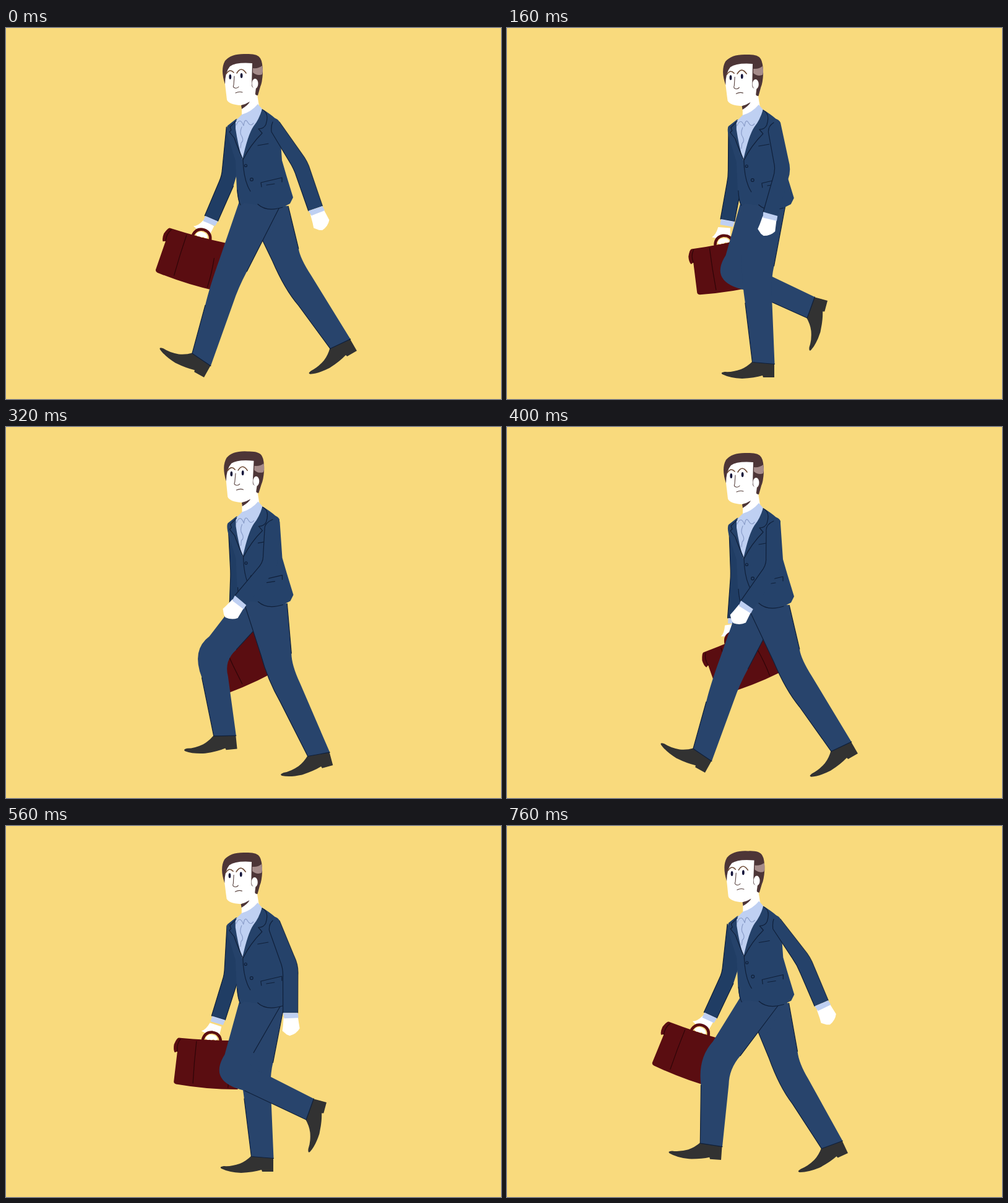
An HTML page for the animation above (0.8 s loop, 800 px wide and 600 px high).

```html
<!DOCTYPE html>
<html lang="en">
<head>
<meta charset="utf-8">
<title>Walking to work</title>
<style>
  html, body { margin: 0; width: 100%; height: 100%; overflow: hidden; background: #f9da7d; }
  svg { display: block; width: 100%; height: 100%; }
  .pants { fill: #28446c; }
  .jacket { fill: #25426a; }
  .sleeve { fill: #203d64; }
  .shirt { fill: #bfd0f2; }
  .skin { fill: #fff; }
  .hair { fill: #4d3537; }
  .shoe { fill: #323232; }
  .bag { fill: #5a0d11; }
  .ink, .fold, .brow, .line, .seam, .grip { fill: none; stroke-linecap: round; stroke-linejoin: round; }
  .ink { stroke: #10203a; stroke-width: 1.2; }
  .fold { stroke: #8a9dc9; stroke-width: 1.2; }
  .brow { stroke: #6e4a35; stroke-width: 1.6; }
  .line { stroke: #5a4440; stroke-width: 1.1; }
  .seam { stroke: #2e0508; stroke-width: 1.2; }
  .grip { stroke: #5a0d11; stroke-width: 4.5; }
</style>
</head>
<body>
<svg viewBox="0 0 800 600" xmlns="http://www.w3.org/2000/svg">
  <defs>
    <path id="shoe" class="shoe" d="M0 -23L-35 -26Q-44 -17 -54 -13Q-68 -8 -80 -9Q-88 -8 -84 -5Q-72 1 -52 2Q-32 1 -19 -3L-18 0L0 0Z"/>
  </defs>
  <rect width="800" height="600" fill="#f9da7d"/>

  <g id="bag">
    <path class="bag" d="M-53 2Q-56 2 -60 13Q-61 22 -58 26L-54 24L-57 73Q-57 76 -53 77Q0 83 47 80L43 1Q0 4 -53 2Z"/>
    <path class="seam" d="M-50 4Q-56 12 -54 24M-24 6Q-26 40 -26 74M29 30Q32 55 31 78"/>
  </g>
  <path id="farSleeve" class="sleeve"/>
  <path id="farEdge" class="ink"/>
  <g id="grip">
    <path class="skin" d="M-17 -11Q-10 -13 -4 -25L15 -20L12 -4L0 -9L-8 -7Z"/>
    <path class="grip" d="M-14 2Q-11 -10 1 -10Q13 -9 15 3"/>
    <path class="skin" d="M-10 0Q-6 -7 0 -6Q8 -6 10 1Q6 4 3 1Q0 4 -3 2Q-7 4 -10 0Z"/>
  </g>
  <path id="farCuff" class="shirt"/>

  <g id="farLeg"><use href="#shoe"/><path class="pants"/><path class="ink"/></g>
  <path id="hips" class="pants" d="M380 274L452 274L446 292L418 342L386 292Z"/>
  <g id="nearLeg"><use href="#shoe"/><path class="pants"/><path class="ink"/></g>

  <g id="torso">
    <path class="jacket" d="M372 147L358 158Q355 163 360 180L371 215L373 262Q375 280 379 287L385 283L407 286Q419 297 447 290L459 284L464 274L453 238L446 214L442 156Q440 147 414 131L384 150Z"/>
    <path class="skin" d="M381 128L404 96L409 126L381 152Z"/>
    <path class="shirt" d="M407 123L414 131Q409 148 400 159Q391 172 382 213Q375 190 371 163L371 150L381 140Q396 136 407 123Z"/>
    <path class="fold" d="M372 157Q378 143 384 158Q386 144 391 153Q395 160 400 154M381 160Q377 170 381 175Q385 182 380 186L379 194"/>
    <path class="ink" d="M414 132Q426 137 420 156Q417 163 408 163L414 170Q395 189 383 213Q373 190 369 178L361 168L364 165L362 160L372 150M383 213Q384 247 395 264M407 190L424 187M413 257L412 250L446 242L446 249M421 254L434 252M407 285Q421 298 447 290M374 262Q375 280 379 286"/>
    <circle class="ink" cx="387.5" cy="222.5" r="2"/>
    <circle class="ink" cx="397" cy="245" r="2.4"/>
  </g>

  <g id="head">
    <path class="skin" d="M357 55L353 82L357 116Q360 124 380 125Q395 121 404 107L407 54Z"/>
    <path class="hair" d="M380 125Q388 123 394 119Q392 124 381 131Z"/>
    <path class="hair" d="M354 91Q346 67 354 53Q364 41 388 42Q407 41 411 49Q415 55 415 73Q414 89 411 95L407 109Q402 109 403 105L404 97Q397 98 397 92L398 57Q372 55 362 62Q354 71 354 91Z"/>
    <path fill="#a58b8a" d="M399 65Q408 66 414 61Q416 69 414 75Q406 78 399 72Z"/>
    <ellipse class="skin" cx="402.5" cy="90" rx="5" ry="8"/>
    <ellipse fill="#14143a" cx="362.3" cy="79" rx="1.9" ry="4"/>
    <ellipse fill="#14143a" cx="380.6" cy="77" rx="1.9" ry="4"/>
    <path class="brow" d="M356 74Q362 65 368 72M373 73Q380 61 388 73"/>
    <path class="line" d="M369 78L368 92Q366 96 370 97Q374 98 376 95M371 105Q377 102 382 104"/>
  </g>

  <path id="nearSleeve" class="jacket"/>
  <path id="nearInk" class="ink"/>
  <path id="nearBack" class="ink"/>
  <g id="nearHand">
    <path class="skin" d="M-11 7L12 6L15 25Q10 34 -1 37L-6 35L-13 29L-12 21Z"/>
    <path class="shirt" d="M-12 0L12 0L13 8L-10 9Z"/>
  </g>
</svg>

<script>
const LOOP = 800, STEP = 40;
const $ = id => document.getElementById(id);

// time, heel x, heel y, toe drop in degrees, front knee x y, back knee x y
const stride = [
  [0, 320, 565, -29, 331, 415, 376, 420],
  [80, 395, 566, 0, 357, 408, 403, 397],
  [160, 432, 565, 0, 380, 404, 427, 409],
  [240, 471, 566, 0, 397, 405, 442, 402],
  [280, 503, 559, 5, 408, 396, 452, 386],
  [360, 551, 535, 25, 441, 421, 473, 387],
  [400, 567, 528, 30, 451, 422, 477, 377],
  [480, 550, 462, 84, 402, 422, 427, 385],
  [560, 518, 447, 75, 343, 408, 389, 386],
  [640, 447, 481, 49, 323, 368, 371, 371],
  [680, 404, 512, 17, 308, 364, 355, 374],
  [760, 346, 540, -4, 314, 379, 361, 393]
];
const bounce = [[0, 0], [80, 5], [160, 1], [240, -2], [280, -3], [360, -1.5]];

// smooth periodic curve through timed keys
function sample(keys, period, time) {
  const n = keys.length, t = ((time % period) + period) % period;
  const key = i => {
    const turn = Math.floor(i / n), k = keys[i - turn * n];
    return [k[0] + turn * period, ...k.slice(1)];
  };
  let i = n - 1;
  while (keys[i][0] > t) i--;
  const [a, b, c, d] = [i - 1, i, i + 1, i + 2].map(key);
  const span = c[0] - b[0], u = (t - b[0]) / span;
  return b.slice(1).map((v, j) => {
    const k = j + 1;
    const m0 = (c[k] - a[k]) / (c[0] - a[0]) * span;
    const m1 = (d[k] - b[k]) / (d[0] - b[0]) * span;
    const w = c[k] - v;
    return v + u * (m0 + u * (3 * w - 2 * m0 - m1 + u * (m0 + m1 - 2 * w)));
  });
}

const rad = deg => deg * Math.PI / 180;
const mix = (a, b, k) => [a[0] + (b[0] - a[0]) * k, a[1] + (b[1] - a[1]) * k];
const str = p => p[0].toFixed(2) + ' ' + p[1].toFixed(2);
const wave = (t, peak) => Math.cos(2 * Math.PI * (t - peak) / LOOP);

// a limb edge: straight, rounded joint, straight
function bend(a, joint, b, r, bulge = 1.3) {
  const p = mix(a, joint, 1 - r), q = mix(joint, b, r);
  const c = mix(mix(p, q, 0.5), joint, bulge);
  return `${str(a)}L${str(p)}Q${str(c)} ${str(q)}L${str(b)}`;
}

// point at a distance along a limb, and across it
function reach(p, deg, along, across = 0) {
  const s = Math.sin(rad(deg)), c = Math.cos(rad(deg));
  return [p[0] + s * along + c * across, p[1] + c * along - s * across];
}

function drawLeg(id, phase, lift, bob) {
  const [hx, hy, drop, fx, fy, bx, by] = sample(stride, LOOP, phase);
  const heel = [hx, hy - lift], front = [fx, fy - lift / 2], back = [bx, by - lift / 2];
  const c = Math.cos(rad(drop)), s = Math.sin(rad(drop));
  const onFoot = (x, y) => [heel[0] - x * c - y * s, heel[1] + x * s - y * c];
  const cuffF = onFoot(35.5, 24.5), cuffB = onFoot(-0.5, 21.5);
  const hipF = [380 + 0.05 * (fx - 380), 279 + bob];
  const hipB = [450 + 0.13 * (bx - 430), 288 + bob];
  const shin = bend(hipF, front, cuffF, 0.3, 1.65);
  const [shoe, pants, ink] = $(id).children;
  shoe.setAttribute('transform', `translate(${str(heel)}) rotate(${-drop})`);
  pants.setAttribute('d', `M${shin}L${bend(cuffB, back, hipB, 0.2)}Z`);
  const edge = fx > 385 ? shin : `${str(mix(front, cuffF, 0.3))}L${str(cuffF)}`;
  ink.setAttribute('d', `M${edge}L${str(cuffB)}M${str(mix(back, hipB, 0.2))}L${str(hipB)}`);
}

function drawFarArm(t, bob) {
  const s = wave(t, 722), tilt = -(13.5 + 11.5 * s);
  const top = [357.5 - 1.5 * s, 160 + bob], elbow = [355 - 8 * s, 239 + bob];
  const wrist = reach(elbow, tilt, 70), wristIn = reach(elbow, tilt, 70, 23);
  const inner = reach(elbow, tilt, 8, 24);
  const edge = bend(top, elbow, wrist, 0.15);
  $('farSleeve').setAttribute('d', `M${edge}L${str(wristIn)}L${str(inner)}L384 ${200 + bob}Z`);
  $('farEdge').setAttribute('d', `M${edge}L${str(wristIn)}L${str(inner)}`);
  const cuff = [reach(wrist, tilt, 0, 1), wristIn, reach(wristIn, tilt, 9, -1), reach(wrist, tilt, 9, 1)];
  $('farCuff').setAttribute('d', 'M' + cuff.map(str).join('L') + 'Z');
  const hand = [341 - 30 * s, 344.4 - 3.9 * s - 8.2 * s * s + bob];
  const place = `translate(${str(hand)}) rotate(${-3.7 + 23.5 * s})`;
  $('bag').setAttribute('transform', place);
  $('grip').setAttribute('transform', place);
}

function drawNearArm(t, bob) {
  const s = wave(t, 728), upper = 18.5 + 21.5 * s, fore = -8 + 32 * s;
  const elbow = reach([430, 160 + bob], upper, 72 + 6 * s);
  const wrist = reach(elbow, fore, 74);
  const mid = (upper + fore) / 2;
  const outer = bend([442, 152 + bob], reach(elbow, mid, 0, 12.5), reach(wrist, fore, 0, 12), 0.2);
  const inner = bend(reach(wrist, fore, 0, -12), reach(elbow, mid, 0, -12.5), [424 + 6 * s, 168 + bob], 0.2);
  $('nearSleeve').setAttribute('d', `M${outer}L${inner}Q424 ${154 + bob} 432 ${145 + bob}Q440 ${147 + bob} 442 ${152 + bob}Z`);
  $('nearInk').setAttribute('d', `M${inner}Q${423 + 6 * s} ${158 + bob} 431 ${152 + bob}`);
  $('nearBack').setAttribute('d', 'M' + outer);
  $('nearBack').setAttribute('opacity', s > 0 ? 0.8 : 0);
  $('nearHand').setAttribute('transform', `translate(${str(wrist)}) rotate(${-fore})`);
}

function draw(now) {
  const t = Math.floor(now / STEP) * STEP % LOOP;
  const bob = sample(bounce, LOOP / 2, t)[0];
  drawFarArm(t, bob);
  drawLeg('farLeg', t + LOOP / 2, 6, bob);
  drawLeg('nearLeg', t, 0, bob);
  drawNearArm(t, bob);
  $('hips').setAttribute('transform', `translate(0 ${bob})`);
  $('torso').setAttribute('transform', `translate(${-0.2 * bob} ${bob})`);
  $('head').setAttribute('transform', `translate(${-0.2 * bob} ${bob}) rotate(${-0.5 * bob} 395 150)`);
}

const begin = performance.now();
function tick() {
  draw(performance.now() - begin);
  requestAnimationFrame(tick);
}
tick();
</script>
</body>
</html>
```
